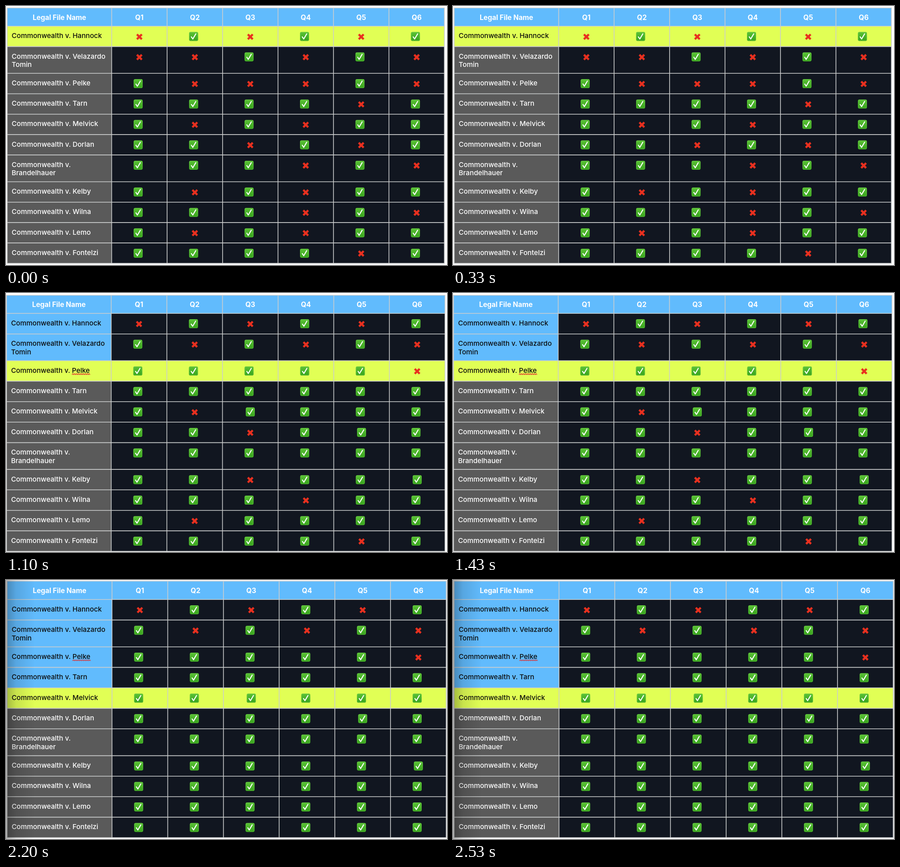
These frames come from a looping animation (975 px wide and 574 px high, 2750 ms). An HTML page:

```html
<!DOCTYPE html>
<html lang="en">
<head>
<meta charset="utf-8">
<title>Legal file review</title>
<style>
  html, body { margin: 0; width: 100%; height: 100%; overflow: hidden; background: #fff; }
  svg { display: block; width: 975px; height: 574px; font: 500 15.2px Inter, "Open Sans", sans-serif; }
  .head { font-weight: 700; font-size: 15.4px; fill: #fff; text-anchor: middle; }
</style>
</head>
<body>
<svg viewBox="0 0 975 574">
  <defs>
    <linearGradient id="green" x1="0" y1="0" x2="0" y2="1">
      <stop offset="0" stop-color="#5bc236"/>
      <stop offset="1" stop-color="#37a31c"/>
    </linearGradient>
    <linearGradient id="shade">
      <stop offset="0" stop-color="#000" stop-opacity=".28"/>
      <stop offset=".35" stop-color="#000" stop-opacity=".11"/>
      <stop offset="1" stop-color="#000" stop-opacity="0"/>
    </linearGradient>
    <g id="yes">
      <rect x="-10" y="-10" width="20" height="20" rx="3.4" fill="url(#green)"/>
      <rect x="-9" y="-9" width="18" height="18" rx="2.4" fill="none" stroke="#7bd35b" stroke-opacity=".55" stroke-width=".8"/>
      <path d="M-5 .8L-1.8 5.6L4.9-5.8" fill="none" stroke="#fff" stroke-width="2.2" stroke-linecap="round" stroke-linejoin="round"/>
    </g>
    <path id="no" d="M-5.4-5.4L5.4 5.4M5.4-5.4L-5.4 5.4" fill="none" stroke="#e9301f" stroke-width="4.6"/>
  </defs>
  <g id="table"></g>
</svg>
<script>
const STEP = 550;
const PREFIX = "Commonwealth v.";
const FLAGGED = 2; // row whose name gets a spelling squiggle
const ACTIVE = "#e1ff55";
const BLUE = "#61bbfd";

// "/" marks the line break inside a label
const names = [" Hannock", " Velazardo/Tomin", " Pelke", " Tarn", " Melvick", " Dorlan",
  "/Brandelhauer", " Kelby", " Wilna", " Lemo", " Fontelzi"];

// v = check, c = check centred in its cell, x = cross
const steps = [
  { x: 2.6, y: 4.3, first: 231, col: 122.6, head: 40.4, row: 45.2, tall: 59.4,
    marks: "xvxvxv xxvxvx vxxxvx vvvvxv vxvxvv vvxvxv vvvxvx vxvxvv vvvxvx vxvxvv vvvvxv" },
  { x: 4.2, y: 5.4, first: 231.1, col: 122.75, head: 40.4, row: 45.3, tall: 59.3,
    marks: "xvxvxv vxvxvx vxxxvx vvvvvv vvxvvv vvxvxv xvvvvv vxvvvx vvvxvv xvvvvv vxvvxv" },
  { x: 1.2, y: 5, first: 231.4, col: 123, head: 40.3, row: 45.4, tall: 59.3,
    marks: "xvxvxv vxvxvx vvvvvx vvvvvv vxcvvv vvxvcv vvvvvv vvxvvc vvvxvv vxvvvv vvvvxv" },
  { x: 2.6, y: 4.6, first: 231.3, col: 122.8, head: 40.4, row: 45.25, tall: 59.3,
    marks: "xvxvxv vxvxvx vvvvvx vvvvvv vvcvvv vvvvcv vvvvvv vvxvvc vvvvvv vxvvvv vvvvxv" },
  { x: 2.4, y: 2.5, first: 232, col: 123.15, head: 40.7, row: 45.4, tall: 59.6, shade: true,
    marks: "xvxvxv vxvxvx vvvvvx vvvvvv vvcvvv vvvvcv vvvvvv vvvvvc vvvvvv vvvvvv vvvvvv" }
];

const table = document.getElementById("table");

function add(tag, attrs, text) {
  const el = document.createElementNS("http://www.w3.org/2000/svg", tag);
  for (const key in attrs) el.setAttribute(key, attrs[key]);
  if (text) el.textContent = text;
  return table.appendChild(el);
}

const box = (x, y, width, height, fill) => add("rect", { x, y, width, height, fill });

function squiggle(label, y) {
  const start = label.getStartPositionOfChar(PREFIX.length + 1).x;
  const end = label.getEndPositionOfChar(label.getNumberOfChars() - 1).x;
  let d = `M${start} ${y + 1.2}`;
  for (let x = start + 2, up = true; x <= end + 1; x += 2, up = !up) d += `L${x} ${y + (up ? -1.2 : 1.2)}`;
  add("path", { d, fill: "none", stroke: "#e02b2b", "stroke-width": 1.2, "stroke-linejoin": "round" });
}

function drawLabel(row, x, y, fill) {
  return (PREFIX + names[row]).split("/").map((line, i) =>
    add("text", { x, y: y + i * 18.6, fill }, line))[0];
}

function draw(index) {
  const s = steps[index];
  const left = s.x + s.first;
  const right = left + 6 * s.col;
  const center = i => left + (i + 0.5) * s.col;
  const lines = [s.y];
  table.replaceChildren();

  box(s.x, s.y, right - s.x, s.head, BLUE);
  add("text", { x: s.x + s.first / 2, y: s.y + 26.4, class: "head" }, "Legal File Name");
  for (let i = 0; i < 6; i++) add("text", { x: center(i), y: s.y + 26.4, class: "head" }, "Q" + (i + 1));

  let y = s.y + s.head;
  s.marks.split(" ").forEach((marks, row) => {
    const height = names[row].includes("/") ? s.tall : s.row;
    const active = row === index;
    const labelFill = active ? ACTIVE : row < index ? BLUE : "#5a5a5a";
    lines.push(y);
    box(s.x, y, s.first, height, labelFill);
    box(left, y, right - left, height, active ? ACTIVE : "#111620");

    const label = drawLabel(row, s.x + 10, y + 26.6, row <= index ? "#0b0b0b" : "#fff");
    if (row === FLAGGED && index > 0) squiggle(label, y + 29.8);

    [...marks].forEach((mark, i) => {
      const cross = mark === "x";
      const dx = mark === "v" ? -2.7 : 0;
      const dy = cross ? 23.5 : 22.8;
      add("use", { href: cross ? "#no" : "#yes", x: center(i) + dx, y: y + dy });
    });
    y += height;
  });
  lines.push(y);

  let d = lines.map(v => `M${s.x - 0.8} ${v}H${right + 0.8}`).join("") + `M${s.x} ${s.y}V${y}`;
  for (let i = 0; i <= 6; i++) d += `M${left + i * s.col} ${s.y}V${y}`;
  add("path", { d, fill: "none", stroke: "#cbcdcd", "stroke-width": 1.6 });

  if (s.shade) box(0, 0, 64, 574, "url(#shade)");
}

let shown = -1;
const begin = performance.now();

function tick() {
  const index = Math.floor((performance.now() - begin) / STEP) % steps.length;
  if (index !== shown) draw(shown = index);
  requestAnimationFrame(tick);
}
tick();
</script>
</body>
</html>
```
